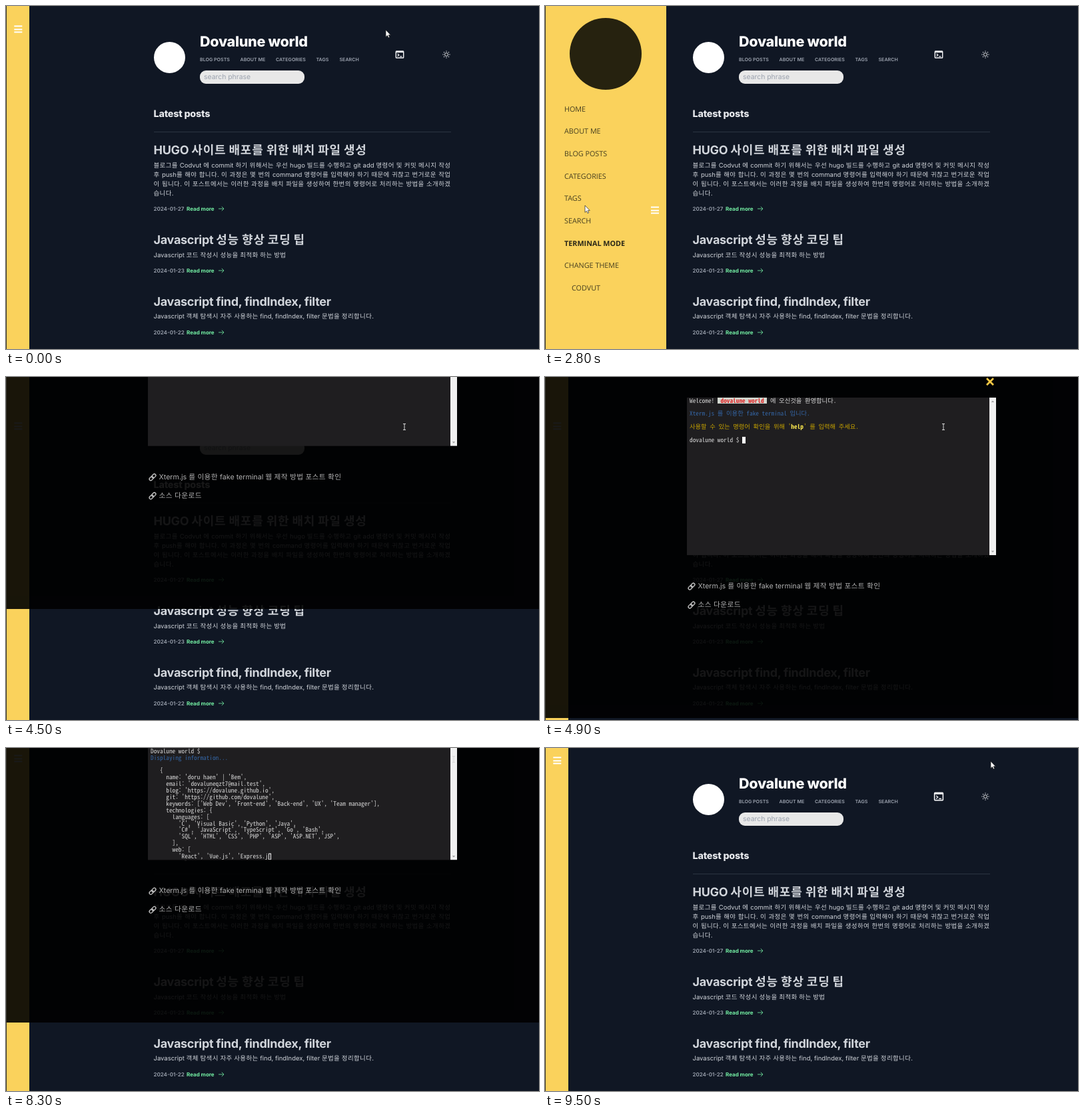
These frames come from a looping animation (800x516 px, 9600 ms). An HTML page:

```html
<!DOCTYPE html>
<html lang="ko">
<head>
<meta charset="utf-8">
<title>Blog with fake terminal</title>
<style>
html, body { margin: 0; width: 100%; height: 100%; overflow: hidden; background: #101724; }
#stage { position: relative; width: 800px; height: 516px; overflow: hidden; background: #101724;
  font-family: Inter, "Noto Sans CJK KR", "Noto Sans CJK", sans-serif;
  font-optical-sizing: none; text-rendering: geometricPrecision; }
#stage div, #stage svg, pre { position: absolute; }
.t { white-space: nowrap; line-height: 20px; }
.tight { letter-spacing: -.016em; }
.k { letter-spacing: .04em; }
.tight .k { letter-spacing: .046em; }
.full { width: 446px; text-align: justify; text-align-last: justify; }
#side { left: 0; top: 0; width: 182px; height: 516px; background: #fad25c; }
#side .t { font-family: "Open Sans", "Noto Sans", sans-serif; }
#ham { left: 158.5px; top: 0; width: 12px; height: 11px; }
#ham i { display: block; height: 2px; margin-bottom: 2.6px; background: #fff; }
#over { left: 0; top: 0; width: 800px; height: 528px; background: rgba(0,0,0,.9); }
#term { left: 212.5px; top: 45.5px; width: 464.5px; height: 237.5px; background: #1f1e20; overflow: hidden; }
#bar { right: 0; top: 0; width: 10px; height: 100%; background: #f1f1f1; }
#text { left: 4.5px; top: 0; margin: 0; color: #d6d6d6;
  font: 9.3px/9.89px "Noto Sans Mono CJK KR", "Noto Sans Mono CJK JP", "Noto Sans Mono", monospace; }
#text b, #text u { display: inline-block; height: 9.89px; vertical-align: top; text-decoration: none; }
.tag { background: #d3d7cf; color: #e02a2a; }
.blue { color: #3465a4; }
.gold { color: #c4a000; }
.gold b { color: #fce94f; }
#text u { width: 4.65px; background: #fff; }
#text u.off { background: none; box-shadow: inset 0 0 0 1px #fff; }
svg { overflow: visible; fill: none; left: 0; top: 0; }
</style>
</head>
<body>
<div id="stage">
  <div id="page"></div>
  <div id="side"><div id="ham"><i></i><i></i><i></i></div></div>
  <div id="over">
    <div id="term"><pre id="text"></pre><div id="bar"></div></div>
  </div>
  <div style="left:0;top:0;width:1px;height:516px;background:#33322c"></div>
  <svg id="mouse" width="1" height="1">
    <path id="arrow" d="M0 0V10.5L2.4 8.3 4 11.8 5.7 11 4.2 7.7H7.3Z" fill="#fff" stroke="#222" stroke-width=".7"/>
    <path id="hand" d="M-1.2 .5Q0-.8 1.2 .5V4.6L5.6 5.6Q7 6 6.8 7.6L5.9 12.5H-.4L-3.8 7.8Q-3.8 6.2-2.4 6.8L-1.2 8Z" fill="#fff" stroke="#222" stroke-width=".7"/>
    <path id="beam" d="M-2-4.5H2M0-4.5V4.5M-2 4.5H2" stroke="#d8d8d8" stroke-width="1"/>
  </svg>
</div>
<script>
const LOOP = 9600, STEP = 100;
const $ = id => document.getElementById(id);
const page = $('page'), side = $('side'), over = $('over');

const hangul = s => s.replace(/[가-힣]+/g, '<span class="k">$&</span>');

// y is the middle of the capital letters
function put(parent, x, y, size, weight, color, text, cls = '') {
  const el = document.createElement('div');
  el.className = 't ' + cls;
  el.style.cssText = `left:${x}px;top:${y - 10}px;font-size:${size}px;font-weight:${weight};color:${color}`;
  el.innerHTML = hangul(text);
  parent.append(el);
}
function box(parent, x, y, w, h, color, radius = 0) {
  const el = document.createElement('div');
  el.style.cssText = `left:${x}px;top:${y}px;width:${w}px;height:${h}px;background:${color};border-radius:${radius}px`;
  parent.append(el);
}
function draw(parent, x, y, color, width, inner) {
  parent.insertAdjacentHTML('beforeend',
    `<svg width="1" height="1" style="left:${x}px;top:${y}px" stroke="${color}" stroke-width="${width}">${inner}</svg>`);
  return parent.lastElementChild;
}

// Header
box(page, 221.5, 54, 47, 47, '#fff', 24);
put(page, 291, 54, 21.6, 800, '#fff', 'Dovalune world', 'tight');
[['BLOG POSTS', 291], ['ABOUT ME', 351.5], ['CATEGORIES', 405], ['TAGS', 465.5], ['SEARCH', 500.5]]
  .forEach(([s, x]) => put(page, x, 81, 7.1, 600, '#9ca3af', s));
box(page, 291, 97.2, 156.5, 19.8, '#e8e8e8', 9);
put(page, 297, 107, 10.4, 400, '#9ca3af', 'search phrase');
const icon = draw(page, 591, 72.7, '#f3f4f6', 1.4,
  '<rect x="-5.7" y="-5" width="11.4" height="10" rx=".8"/><path d="M-5.7-4H5.7" stroke-width="2.2"/><path d="M-3.4-1.2-1.2 .8-3.4 2.8M.2 2.9H3.4" stroke-width="1.2"/>');
icon.style.transformOrigin = '0 0';
let rays = '';
for (let i = 0; i < 8; i++) rays += `<path d="M0-4.1V-5.6" transform="rotate(${i * 45})"/>`;
draw(page, 660.5, 72.5, '#e5e7eb', 1, '<circle r="2.5"/>' + rays);

// Posts
put(page, 221.5, 163, 14.4, 800, '#e5e7eb', 'Latest posts', 'tight');
box(page, 221.5, 188.5, 446, 1, '#2c3441');
const posts = [
  [218, '2024-01-27', 'HUGO 사이트 배포를 위한 배치 파일 생성', [
    '블로그를 Codvut 에 commit 하기 위해서는 우선 hugo 빌드를 수행하고 git add 명령어 및 커밋 메시지 작성',
    '후 push를 해야 합니다. 이 과정은 몇 번의 command 명령어를 입력해야 하기 때문에 귀찮고 번거로운 작업',
    '이 됩니다. 이 포스트에서는 이러한 과정을 배치 파일을 생성하여 한번의 명령어로 처리하는 방법을 소개하겠',
    '습니다.']],
  [353, '2024-01-23', 'Javascript 성능 향상 코딩 팁', ['Javascript 코드 작성시 성능을 최적화 하는 방법']],
  [445.5, '2024-01-22', 'Javascript find, findIndex, filter',
    ['Javascript 객체 탐색시 자주 사용하는 find, findIndex, filter 문법을 정리합니다.']]
];
for (const [y, date, title, lines] of posts) {
  const last = lines.length - 1, foot = y + 45 + last * 14;
  put(page, 221.5, y, 18, 700, '#d1d5db', title, 'tight');
  lines.forEach((s, i) => put(page, 221.5, y + 22.5 + i * 14, 9.48, 400, '#d1d5db', s, i < last ? 'full' : ''));
  put(page, 221.5, foot, 8, 600, '#9ca3af', date);
  put(page, 271, foot, 8, 700, '#74f0a4', 'Read more');
  draw(page, 318.5, foot, '#74f0a4', .8, '<path d="M0 0H8M4.8-3.2 8 0 4.8 3.2"/>');
}

// Side menu
box(side, 37, 18, 108, 108, '#26220f', 54);
['HOME', 'ABOUT ME', 'BLOG POSTS', 'CATEGORIES', 'TAGS', 'SEARCH', 'TERMINAL MODE', 'CHANGE THEME', 'CODVUT']
  .forEach((s, i) => put(side, i === 8 ? 40 : 29, 155.5 + i * 33.7, 10.8, i === 6 ? 700 : 400, i === 6 ? '#2a2718' : '#453e20', s));

// Overlay
draw(over, 668, 21.5, '#f6c945', 2.8, '<path d="M-5-5 5 5M5-5-5 5"/>');
draw($('bar'), 5, 0, 'none', 0, '<path d="M-2.2 7H2.2L0 4.5ZM-2.2 230.5H2.2L0 233Z" fill="#a0a0a0"/>');
[[330, 'Xterm.js 를 이용한 fake terminal 웹 제작 방법 포스트 확인'], [357.5, '소스 다운로드']].forEach(([y, s]) => {
  put(over, 229.5, y, 10.66, 400, '#b0b0b0', s);
  draw(over, 219.5, y, '#c8c8c8', 1.3,
    '<g transform="rotate(-45)"><rect x="-6" y="-2.2" width="6.8" height="4.4" rx="2.2"/><rect x="-.8" y="-2.2" width="6.8" height="4.4" rx="2.2"/></g>');
});

// Terminal contents
const intro = [
  'Welcome! <b class="tag"> dovalune world </b> 에 오신것을 환영합니다.', '',
  '<span class="blue">Xterm.js 를 이용한 fake terminal 입니다.</span>', '',
  '<span class="gold">사용할 수 있는 명령어 확인을 위해 \'<b>help</b>\' 를 입력해 주세요.</span>', ''
];
const info = `
   {
     name: 'doru haen' | 'Bem',
     email: 'dovaluneqzt7@mail.test',
     blog: 'https://dovalune.github.io',
     git: 'https://github.com/dovalune',
     keywords: ['Web Dev', 'Front-end', 'Back-end', 'UX', 'Team manager'],
     technologies: {
       languages: [
         'C', 'Visual Basic', 'Python', 'Java',
         'C#', 'JavaScript', 'TypeScript', 'Go', 'Bash',
         'SQL', 'HTML', 'CSS', 'PHP', 'ASP', 'ASP.NET','JSP',
       ],
       web: [
         'React', 'Vue.js', 'Express.js', 'Node.js', 'jQuery',
       ],
     },
   }`;
const after = s => info.indexOf(s) + s.length;
const mark = after('\n     ke'), pace = (after('Express.j') - mark) / 1400;
const keys = [5400, 5600, 5700, 5900], ENTER = 6100, BLUR = 8100;

function screen(t) {
  const typed = 'info'.slice(0, keys.filter(k => t >= k).length);
  const rows = [...intro, 'dovalune world $ ' + typed];
  if (t >= ENTER) {
    rows.push('Dovalune world $ ', '<span class="blue">Displaying information...</span>');
    const n = Math.round(mark + (t - 6900) * pace);
    if (n > 0) rows.push(...info.slice(0, n).split('\n'));
  }
  rows[rows.length - 1] += `<u class="${t >= BLUR ? 'off' : ''}"></u>`;
  return rows.slice(-24).join('\n');
}

// Sliding panels: [time, value], each stretch eased
function track(el, axis, steps) {
  const frames = steps.map(([t, v]) => ({ offset: t / LOOP, transform: `translate${axis}(${v}px)`, easing: 'ease' }));
  const a = el.animate(frames, { duration: LOOP, iterations: Infinity });
  a.pause();
  return a;
}
const slides = [
  track(side, 'X', [[0, -146.7], [1160, -146.7], [2160, 0], [3040, 0], [4040, -146.7], [LOOP, -146.7]]),
  track(over, 'Y', [[0, -528], [4115, -528], [5115, 0], [8135, 0], [9135, -528], [LOOP, -528]])
];

const path = [
  [0, 570, 36], [300, 570, 36], [700, 400, 120], [1000, 120, 205], [1150, 33, 226], [1400, 27, 233],
  [1500, 26, 235], [2000, 42, 256], [2500, 46, 325], [2800, 60, 300], [3040, 190, 250], [3500, 400, 170],
  [4000, 575, 90], [4100, 597, 75], [4200, 598, 75], [7200, 598, 75], [7600, 650, 36], [7800, 683, 2],
  [8000, 672, 17], [8400, 672, 17], [8800, 669, 20], [LOOP, 669, 20]
];
function mouseAt(t) {
  const i = Math.max(1, path.findIndex(p => p[0] >= t));
  const [a, b] = [path[i - 1], path[i]], k = (t - a[0]) / (b[0] - a[0]);
  return [a[1] + (b[1] - a[1]) * k, a[2] + (b[2] - a[2]) * k];
}
const shapes = [[0, 'arrow'], [4050, 'hand'], [4300, 'arrow'], [4450, 'beam'], [7550, 'arrow'],
  [7950, 'hand'], [8200, 'beam'], [8400, 'arrow']];

let shown = -1;
function frame() {
  const t = Math.floor(performance.now() % LOOP / STEP) * STEP;
  if (t !== shown) {
    shown = t;
    slides.forEach(a => a.currentTime = t);
    const [x, y] = mouseAt(t);
    $('mouse').style.transform = `translate(${x}px,${y}px)`;
    const shape = shapes.filter(s => t >= s[0]).pop()[1];
    ['arrow', 'hand', 'beam'].forEach(id => $(id).style.display = id === shape ? '' : 'none');
    // the menu button trails the mouse by one step
    $('ham').style.transform = `translateY(${mouseAt(Math.max(0, t - STEP))[1] - 6.7}px)`;
    // hovered, then kept slightly larger while focused
    icon.style.transform = `scale(${t < 4050 ? 1 : t < 4300 ? 1.22 : 1.12})`;
    $('text').innerHTML = screen(t);
  }
  requestAnimationFrame(frame);
}
frame();
</script>
</body>
</html>
```
